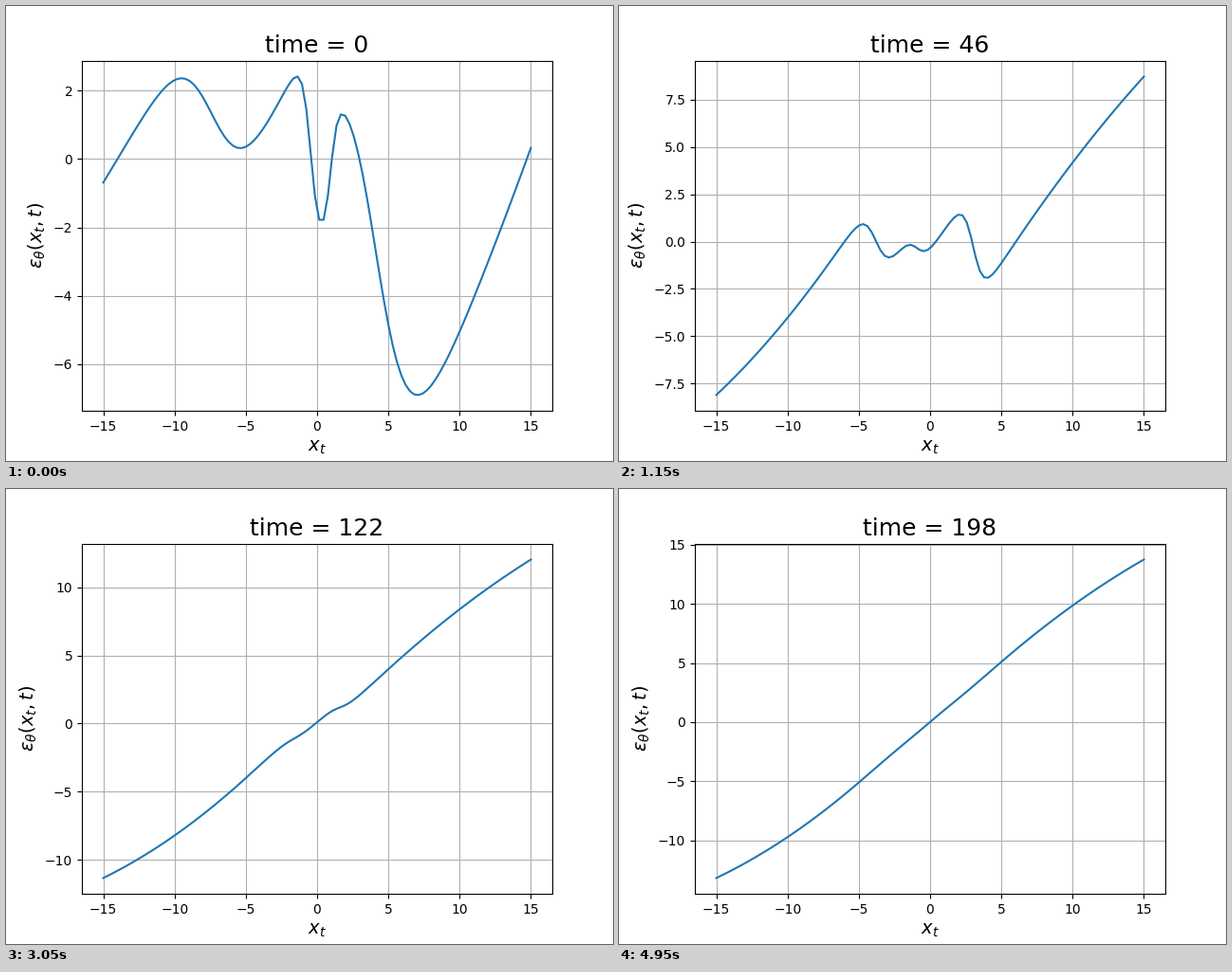
Animation of 640 by 480 pixels, one loop 5000 ms. Source, as a matplotlib script:

```python
import numpy as np
import matplotlib.pyplot as plt
from matplotlib.animation import FuncAnimation

FRAMES, INTERVAL, STEP = 100, 50, 2
EDGE, KNEE = 15, 5


def core(x, t):
    """A rising line, broken by three soft drops that fade as they move inward."""
    early = np.exp(-t / 6)
    near = np.exp(-(t / 47) ** 2)
    fade = np.exp(-0.0262 * t)
    slope = 0.84 + (t / 450) ** 2 + np.exp(-t / 38) - 0.89 * early

    def step(height, center, width):
        return height * np.tanh((x - center) / width)

    left = step(8.3 * fade - 4.2 * early,
                -1.6 - 5.75 * near,
                0.65 + 0.0025 * t + 0.8 * near ** 2 + 0.95 * early)
    middle = step(3.2 * near,
                  -0.65 - 0.7 * near + 0.9 * early,
                  0.45 + 0.006 * t + 0.15 * early)
    right = step(10.65 * fade - 2.3 * early,
                 1.6 + 3.7 * near - 1.2 * early,
                 0.5 + 0.0025 * t + 0.65 * near ** 2 + 1.2 * early)
    rebound = step(2.05 * early, 0.95, 0.5)
    return slope * x - left - middle - right + rebound - 1.3 * early


def curve(x, t):
    """The core with both tails bent so that its ends grow like log(t)."""
    growth = np.log(t + 5)
    low = 4.3 - 3.1 * growth - 0.005 * t
    high = 3.62 * growth - 5.5
    miss = np.where(x < 0, low - core(-EDGE, t), high - core(EDGE, t))
    bend = np.maximum(np.abs(x) - KNEE, 0) / (EDGE - KNEE)
    return core(x, t) + miss * bend ** 2


xs = np.linspace(-EDGE, EDGE, 100)
fig, ax = plt.subplots(figsize=(6.4, 4.8), dpi=100)
line, = ax.plot(xs, curve(xs, 0))
ax.set_xlabel(r"$x_t$", fontsize=14)
ax.set_ylabel(r"$\varepsilon_\theta(x_t, t)$", fontsize=14)
ax.grid(True)


def draw(i):
    t = i * STEP
    line.set_ydata(curve(xs, t))
    ax.relim()
    ax.autoscale_view()
    ax.set_title(f"time = {t}", fontsize=18)
    return line,


anim = FuncAnimation(fig, draw, frames=FRAMES, interval=INTERVAL,
                     init_func=lambda: draw(0), repeat=True, repeat_delay=0)
plt.show()
```
